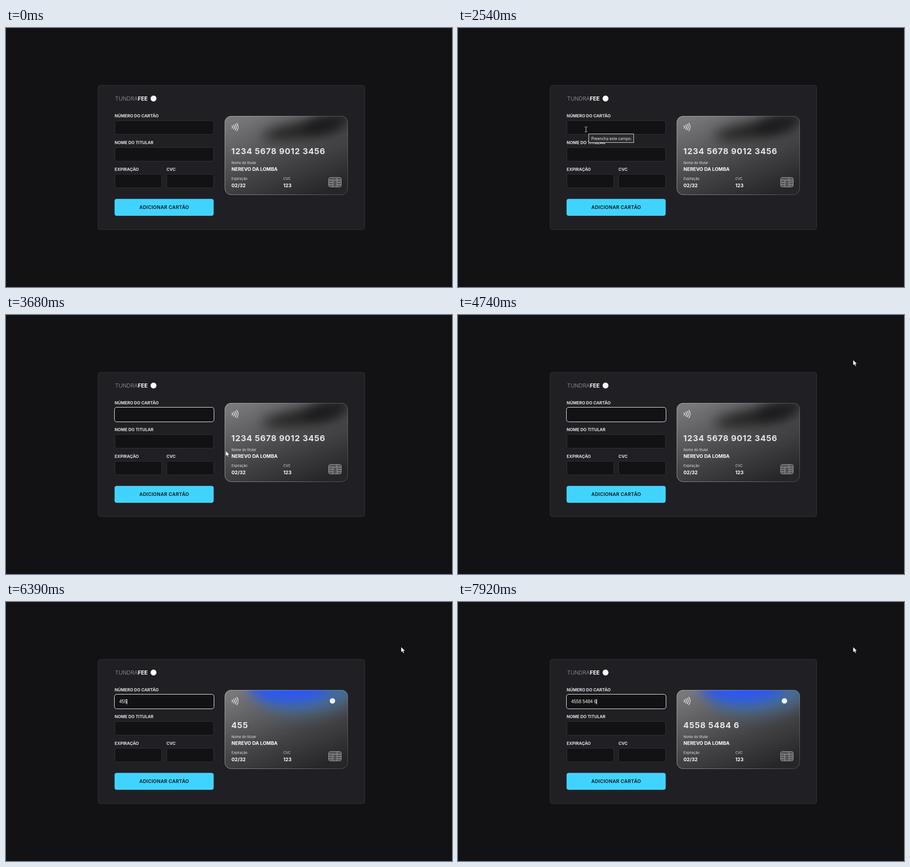
Recreate the animation shown at these times as an HTML page with a canvas. Size 981 by 571 pixels, loop 8000 ms.

```html
<!DOCTYPE html>
<html lang="pt-BR">
<head>
<meta charset="utf-8">
<title>Cartão</title>
<style>
  html, body { margin: 0; width: 100%; height: 100%; overflow: hidden; background: #121214; }
  canvas, svg { position: absolute; left: 0; top: 0; width: 981px; height: 571px; }
  text { font-family: Inter, sans-serif; fill: #fff; white-space: pre; }
  .brand { font-size: 12px; font-weight: 300; fill: #a0a0a6; }
  .brand tspan { font-weight: 700; fill: #fff; }
  .label { font-size: 9.15px; font-weight: 700; fill: #e1e1e6; }
  .button { font-size: 10.5px; font-weight: 600; letter-spacing: .025em; fill: #121214; text-anchor: middle; }
  .small { font-size: 7.5px; fill: #e1e1e6; }
  .value { font-size: 10.5px; font-weight: 700; }
  .number { font-size: 18px; font-weight: 700; letter-spacing: .05em; fill: #e8e8ea; }
  .typed { font: 10px "Liberation Sans", Arial, sans-serif; }
  .tip { font: 8.7px "Open Sans", sans-serif; }
</style>
</head>
<body>
<canvas id="stage" width="981" height="571"></canvas>
<svg viewBox="0 0 981 571">
  <text class="brand" x="240" y="159.5">TUNDRA<tspan>FEE</tspan></text>
  <text class="label" x="239" y="197">NÚMERO DO CARTÃO</text>
  <text class="label" x="239" y="256">NOME DO TITULAR</text>
  <text class="label" x="239" y="315">EXPIRAÇÃO</text>
  <text class="label" x="353" y="315">CVC</text>
  <text class="button" x="348" y="399">ADICIONAR CARTÃO</text>
  <text class="number" id="number" x="495.5" y="277.5"></text>
  <text class="small" x="496" y="300">Nome do titular</text>
  <text class="value" x="496" y="315.2">NEREVO DA LOMBA</text>
  <text class="small" x="496" y="335.2">Expiração</text>
  <text class="value" x="496" y="350.6">02/32</text>
  <text class="small" x="610" y="335.2">CVC</text>
  <text class="value" x="610" y="350.6">123</text>
  <text class="typed" id="typed" x="249" y="223"></text>
  <rect id="caret" y="214" width="1.3" height="11.5" fill="#fff"/>
  <g id="tip">
    <rect x="287.5" y="233.5" width="99" height="19" fill="#2b2b2f" stroke="#e8e8e8"/>
    <text class="tip" x="293" y="246.5">Preencha este campo.</text>
  </g>
  <path id="arrow" d="M0 0V12L2.8 9.5L4.7 13.8L6.8 12.9L5 8.8H8.8Z" fill="#fff" stroke="#000" stroke-width=".6"/>
  <path id="beam" d="M-3 -5.5H-.7M.7 -5.5H3M0 -5V5M-3 5.5H-.7M.7 5.5H3" fill="none" stroke="#e4e4e4"/>
</svg>
<script>
const LOOP = 8000;
const FOCUS = 2940;
const FIELDS = [[239, 204, 218, 31], [239, 263, 218, 31], [239, 322, 104, 31], [353, 322, 104, 31]];
const KEYS = [[5280, '4'], [5990, '45'], [6390, '455'], [6600, '4558'], [6930, '4558 5'],
  [7120, '4558 54'], [7520, '4558 548'], [7710, '4558 5484'], [7920, '4558 5484 6']];

// Each move: frame step in ms, easing power, then [time, x, y] points.
const MOVES = [
  [66.6, 2.6, [[920, 756, 535], [1320, 362, 293.6]]],
  [67.9, 1.4, [[1388, 351, 282], [1660, 314, 243]]],
  [67.4, 1.5, [[1730, 304, 237], [2000, 281, 223]]],
  [70, 1, [[2940, 281, 223], [3010, 268, 262], [3080, 250, 303], [3150, 240, 298]]],
  [77.9, 1, [[3290, 214, 290], [3446, 300, 296], [3680, 483, 299.3]]],
  [70, 1, [[3750, 640, 238], [3820, 796, 142], [3890, 869, 99]]]
];

const el = id => document.getElementById(id);
const ctx = el('stage').getContext('2d');
const show = (node, on) => node.setAttribute('visibility', on ? 'visible' : 'hidden');

function box(x, y, w, h, r, fill, stroke) {
  ctx.beginPath();
  ctx.roundRect(x, y, w, h, r);
  if (fill) { ctx.fillStyle = fill; ctx.fill(); }
  if (stroke) { ctx.strokeStyle = stroke; ctx.lineWidth = 1; ctx.stroke(); }
}

function disc(x, y, r, fill) {
  ctx.beginPath();
  ctx.arc(x, y, r, 0, 7);
  ctx.fillStyle = fill;
  ctx.fill();
}

function blob(x, y, rx, ry, turn, blur, fill) {
  ctx.filter = `blur(${blur}px)`;
  ctx.beginPath();
  ctx.ellipse(x, y, rx, ry, turn, 0, 7);
  ctx.fillStyle = fill;
  ctx.fill();
  ctx.filter = 'none';
}

function gradient(x0, y0, x1, y1, stops) {
  const g = ctx.createLinearGradient(x0, y0, x1, y1);
  stops.forEach(([at, color]) => g.addColorStop(at, color));
  return g;
}

function drawWaves() {
  ctx.strokeStyle = '#fff';
  ctx.lineWidth = 1.3;
  ctx.lineCap = 'round';
  ctx.beginPath();
  for (let i = 0; i < 4; i++) {
    const x = 497 + i * 3.5, h = 2.7 + i * 1.9, bulge = 2.6 + i * 1.2;
    ctx.moveTo(x, 218.4 - h);
    ctx.quadraticCurveTo(x + bulge, 218.4, x, 218.4 + h);
  }
  ctx.stroke();
}

function drawChip() {
  box(709.5, 329.5, 28, 21, 4, '#555557', '#a2a2a4');
  ctx.beginPath();
  ctx.moveTo(709.5, 335.5); ctx.lineTo(737.5, 335.5);
  ctx.moveTo(719, 335.5); ctx.lineTo(719, 350.5);
  ctx.moveTo(728, 329.5); ctx.lineTo(728, 350.5);
  for (const y of [340.5, 345.5]) {
    ctx.moveTo(709.5, y); ctx.lineTo(719, y);
    ctx.moveTo(728, y); ctx.lineTo(737.5, y);
  }
  ctx.stroke();
}

function drawCard(colored) {
  ctx.save();
  ctx.beginPath();
  ctx.roundRect(481, 194, 271, 174, 14);
  ctx.clip();
  ctx.fillStyle = gradient(560, 180, 640, 385,
    [[0, '#78787a'], [.3, '#5e5e60'], [.6, '#434345'], [1, '#262628']]);
  ctx.fillRect(481, 194, 271, 174);
  if (colored) {
    blob(665, 200, 108, 44, -.1, 17, '#436d99');
    blob(622, 186, 90, 36, 0, 14, '#2d57f2');
  } else {
    blob(655, 225, 92, 17, -.16, 14, 'rgba(20,20,21,.85)');
    blob(712, 206, 60, 19, -.3, 13, 'rgba(22,22,24,.8)');
  }
  ctx.restore();
  box(481.5, 194.5, 270, 173, 14, null, gradient(481, 290, 752, 220, [
    [0, 'rgba(255,255,255,.45)'], [.5, 'rgba(255,255,255,.36)'],
    [.8, 'rgba(255,255,255,.22)'], [1, 'rgba(255,255,255,.22)']]));
  drawWaves();
  drawChip();
}

function drawStage(focused, colored, badge) {
  ctx.fillStyle = '#121214';
  ctx.fillRect(0, 0, 981, 571);
  box(202.5, 126.5, 586.5, 318, 4.5, '#202024', '#323238');
  disc(324.5, 155.5, 6.5, '#fff');
  for (const [x, y, w, h] of FIELDS) box(x + .5, y + .5, w - 1, h - 1, 4.5, '#121214', '#323238');
  if (focused) box(238.5, 203.5, 219, 32, 5, '#121214', '#fff');
  box(238.8, 376.8, 218, 37.2, 4.5, '#41d3ff');
  drawCard(colored);
  if (badge) disc(718, 218, 6, '#f2f2f6');
}

function along(points, t, power) {
  const last = points[points.length - 1];
  if (t >= last[0]) return last.slice(1);
  const i = points.findIndex(p => p[0] > t) - 1;
  const [t0, x0, y0] = points[i], [t1, x1, y1] = points[i + 1];
  const k = 1 - (1 - (t - t0) / (t1 - t0)) ** power;
  return [x0 + (x1 - x0) * k, y0 + (y1 - y0) * k];
}

function pointer(t) {
  const move = MOVES.filter(m => m[2][0][0] <= t).pop();
  if (!move) return null;
  const [step, power, points] = move;
  const start = points[0][0], end = points[points.length - 1][0];
  return along(points, t >= end ? end : start + Math.floor((t - start) / step) * step, power);
}

function caretOn(t) {
  if (t < FOCUS) return false;
  if (t < 5280) return t < 3660 || (t >= 4220 && t < 4740);
  return t < 5800 || t >= 5990;
}

function placePointer(t) {
  const p = pointer(t);
  const inField = p && FIELDS.some(([x, y, w, h]) =>
    p[0] >= x && p[0] < x + w && p[1] >= y && p[1] < y + h);
  show(el('arrow'), p && !inField);
  show(el('beam'), inField);
  if (!p) return;
  const [x, y] = inField ? [Math.floor(p[0]) + .5, Math.floor(p[1]) + .5] : p;
  el(inField ? 'beam' : 'arrow').setAttribute('transform', `translate(${x} ${y})`);
}

let drawn = '';
function frame() {
  const t = performance.now() % LOOP;
  const key = KEYS.filter(k => k[0] <= t).pop();
  const typed = key ? key[1] : '';
  const state = [t >= FOCUS, typed !== '', t >= 5470];
  if (state.join() !== drawn) {
    drawn = state.join();
    drawStage(...state);
  }
  el('typed').textContent = typed;
  el('number').textContent = typed || '1234 5678 9012 3456';
  const digits = typed.replaceAll(' ', '').length;
  const width = digits * 5.56 + (typed.length - digits) * 2.78;
  el('caret').setAttribute('x', Math.floor(249 + width) + .2);
  show(el('caret'), caretOn(t));
  show(el('tip'), t >= 2540 && t < FOCUS);
  placePointer(t);
  requestAnimationFrame(frame);
}
frame();
</script>
</body>
</html>
```
